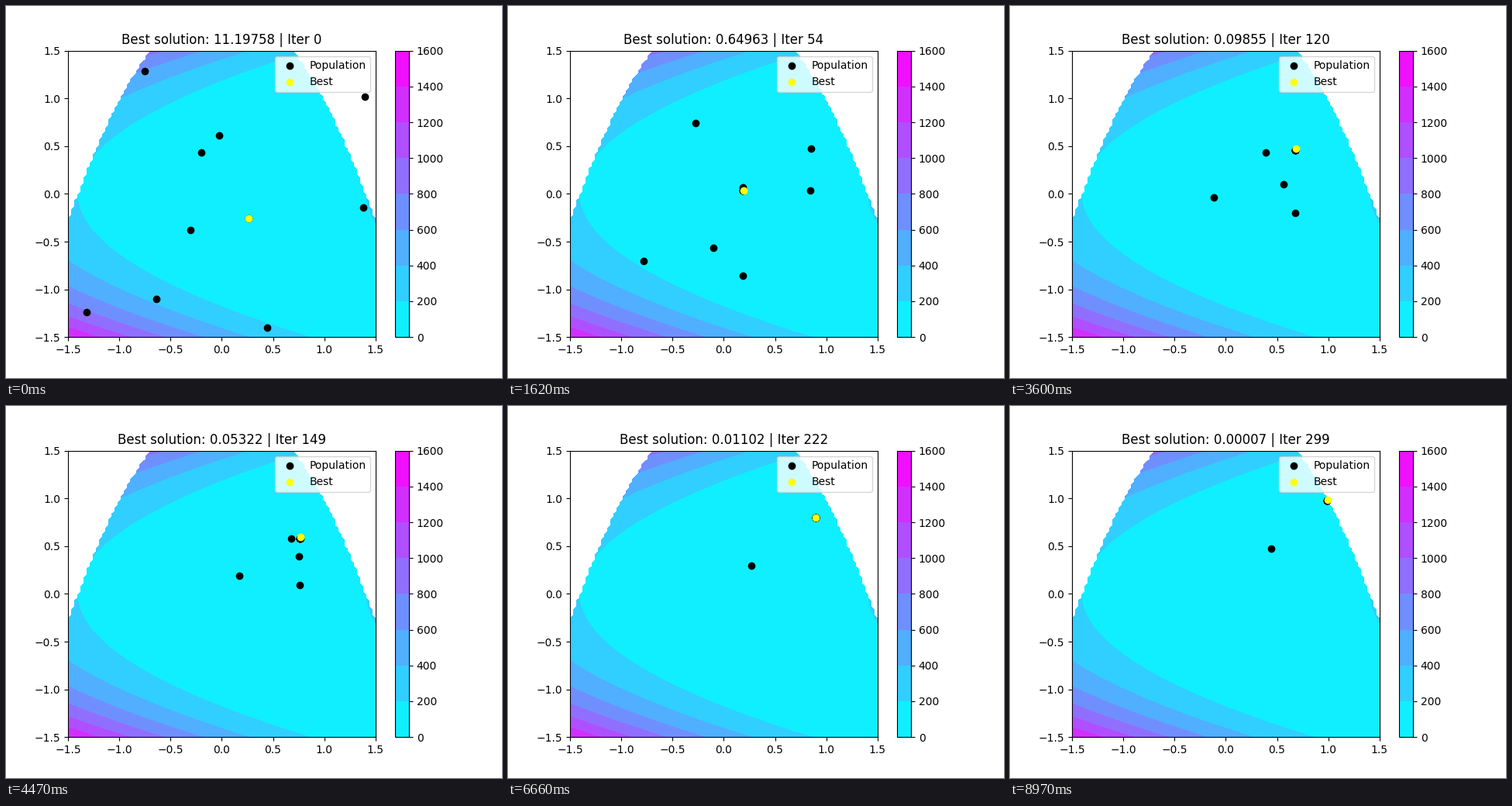
These frames come from a looping animation (640x480 px, 9 s). A matplotlib script:

```python
import numpy as np
import matplotlib.pyplot as plt
from matplotlib.animation import FuncAnimation

FRAMES = 300
STEP = 0.01  # velocity limit per axis and iteration
LIM = 1.5
TAKEOVER, VALLEY = 11, 54  # a new leader appears, then reaches y = x**2

START = np.array([
    [-0.3055, -0.382], [0.265, -0.256231], [-0.1996, 0.4347],
    [-0.0235, 0.611], [1.395, 1.018], [-0.75, 1.285],
    [1.381, -0.143], [0.443, -1.400], [-0.638, -1.101], [-1.3187, -1.239],
])
# Iteration and score of the leader on its way along the valley
MILESTONES = [(54, 0.64963), (95, 0.19965), (120, 0.09855),
              (179, 0.02091), (222, 0.01102), (299, 0.00007)]


def rosenbrock(x, y):
    return (1 - x) ** 2 + 100 * (y - x ** 2) ** 2


def best_path():
    """Wait, run at full speed to the valley, then follow it to (1, 1)."""
    times, scores = np.transpose(MILESTONES)
    x = np.interp(np.arange(FRAMES), times, 1 - np.sqrt(scores))
    path = np.column_stack([x, x ** 2])
    first, second = START[1], START[0] + TAKEOVER * STEP
    run = STEP * np.arange(VALLEY - TAKEOVER)[:, None]
    path[:TAKEOVER] = first
    path[TAKEOVER:VALLEY] = np.minimum(second + run, path[VALLEY])
    return path


def swarm(best):
    """Particles pulled to their own memory and to the leader."""
    rng = np.random.default_rng(4)
    pos, memory = START.copy(), START.copy()
    track = [pos]
    for k in range(1, FRAMES):
        social = 0.33 + 0.17 * (k / FRAMES) ** 6
        r1, r2 = rng.uniform(0.8, 1.2, (2, *pos.shape))
        pull = ((1 - social) * r1 * (memory - pos)
                + social * r2 * (best[k] - pos))
        pos = pos + np.clip(pull, -STEP, STEP)
        better = rosenbrock(*pos.T) < rosenbrock(*memory.T)
        memory[better] = pos[better]
        track.append(pos)
    return np.array(track)


best = best_path()
track = swarm(best)

fig, ax = plt.subplots(figsize=(6.4, 4.8), dpi=100)
grid = np.linspace(-LIM, LIM, 100)
X, Y = np.meshgrid(grid, grid)
Z = np.ma.masked_where(X ** 2 + Y > 2, rosenbrock(Y, X))
field = ax.contourf(X, Y, Z, levels=np.arange(0, 1601, 200), cmap="cool")
fig.colorbar(field)

crowd = ax.scatter(*track[0].T, color="black", label="Population", zorder=2)
leader = ax.scatter(*best[0], color="yellow", label="Best", zorder=3)
ax.set_xlim(-LIM, LIM)
ax.set_ylim(-LIM, LIM)
ax.legend(loc="upper right")
title = ax.set_title("")


def update(k):
    crowd.set_offsets(track[k])
    leader.set_offsets(best[k:k + 1])
    title.set_text(f"Best solution: {rosenbrock(*best[k]):.5f} | Iter {k}")
    return crowd, leader, title


anim = FuncAnimation(fig, update, frames=FRAMES, interval=30,
                     repeat=True, repeat_delay=0)
plt.show()
```
